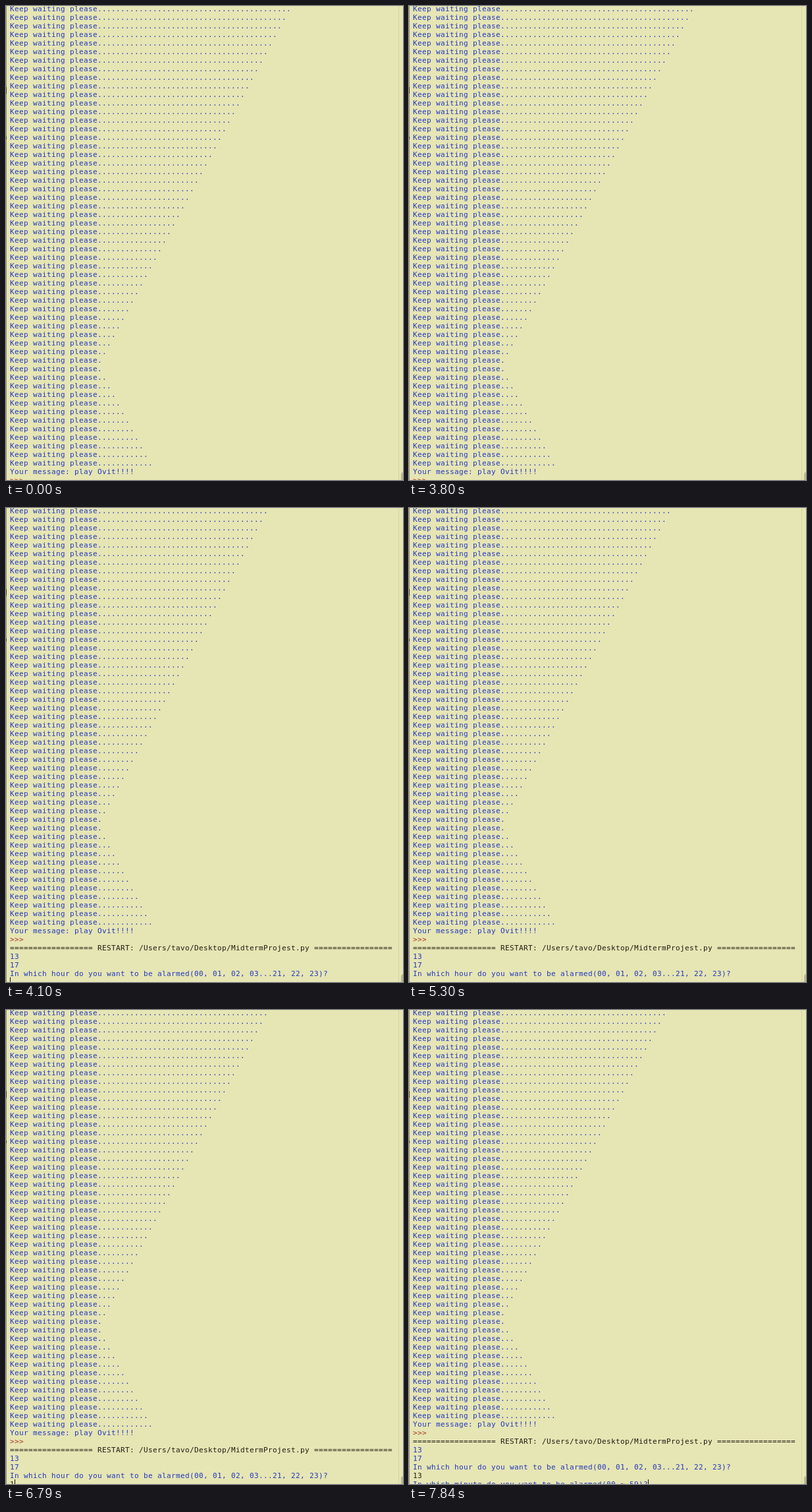
Animation of 603x719 px, one loop 7.99 s. Source, as an HTML page:

```html
<!DOCTYPE html>
<html lang="en">
<head>
<meta charset="utf-8">
<title>Alarm shell</title>
<style>
  html, body { margin: 0; width: 100%; height: 100%; overflow: hidden; }
  body { position: relative; background: #e6e5b4; }
  #text {
    position: absolute; left: 6px; top: -2px; margin: 0;
    font: 11px/13px "DejaVu Sans Mono", monospace;
    letter-spacing: calc(7px - 1ch);
    color: #2237bd;
  }
  .prompt { color: #a8361c; }
  .plain { color: #1d1c12; }
  #cursor { position: absolute; top: 712px; width: 1px; height: 13px; background: #14140c; }
  #shade {
    position: absolute; left: 1px; top: 0; width: 23px; height: 100%;
    background: linear-gradient(90deg, rgba(40, 40, 15, .32), rgba(40, 40, 15, .12) 30%, rgba(40, 40, 15, 0));
  }
  #edge { position: absolute; left: 0; top: 0; width: 1px; height: 100%; background: #96957a; }
  #edge::before, #edge::after { content: ""; position: absolute; width: 1px; background: #45452f; }
  #edge::before { top: 123px; height: 10px; }
  #edge::after { top: 198px; height: 4px; }
  #track { position: absolute; left: 596px; top: 0; width: 1px; height: 100%; background: #d3d2a4; }
  #thumb { position: absolute; left: 600px; top: 707px; width: 8px; height: 20px; border-radius: 4px; background: #b9b88e; }
</style>
</head>
<body>
<pre id="text"></pre>
<div id="cursor"></div>
<div id="shade"></div>
<div id="edge"></div>
<div id="track"></div>
<div id="thumb"></div>
<script>
const DURATION = 7990, ROW = 13, COLUMN = 7, LEFT = 6;
const el = id => document.getElementById(id);
const waiting = dots => ["", "Keep waiting please" + ".".repeat(dots)];

const minuteQuestion = "In which minute do you want to be alarmed(00 ~ 59)?";
const transcript = typed => [
  ...Array.from({ length: 42 }, (_, i) => waiting(42 - i)),
  ...Array.from({ length: 12 }, (_, i) => waiting(i + 1)),
  ["", "Your message: play Ovit!!!!"],
  ["prompt", ">>>"],
  ["plain", "=".repeat(18) + " RESTART: /Users/tavo/Desktop/MidtermProjest.py " + "=".repeat(17)],
  ["", "13"],
  ["", "17"],
  ["", "In which hour do you want to be alarmed(00, 01, 02, 03...21, 22, 23)?"],
  ["plain", typed],
  ["", minuteQuestion]
];

// start, rows scrolled, lines printed, typed text, cursor column (-1 hides it), shaded edge
const steps = [
  [0, 0, 56, "", -1, false],
  [500, 0, 56, "", -1, true],
  [3800, 0, 56, "", -1, false],
  [3950, 2, 57, "", 0, false],
  [4100, 5, 61, "", 0, false],
  [4400, 5, 61, "", -1, false],
  [4700, 5, 61, "", 0, false],
  [5300, 5, 61, "", -1, false],
  [5600, 5, 61, "1", 1, false],
  [5750, 5, 61, "12", 2, false],
  [6190, 5, 61, "12", -1, false],
  [6490, 5, 61, "12", 2, false],
  [6790, 5, 61, "1", 1, false],
  [7090, 5, 61, "13", -1, false],
  [7390, 5, 61, "13", 2, false],
  [7840, 6, 62, "13", minuteQuestion.length, false]
];

function makeLine([className, content]) {
  const span = document.createElement("span");
  span.className = className;
  span.textContent = content + "\n";
  return span;
}

function show([, scroll, count, typed, column, shaded]) {
  el("text").replaceChildren(...transcript(typed).slice(scroll, count).map(makeLine));
  el("cursor").hidden = column < 0;
  el("cursor").style.left = LEFT + column * COLUMN + "px";
  el("shade").hidden = !shaded;
}

const start = performance.now();
let current;
function tick() {
  const time = (performance.now() - start) % DURATION;
  const step = steps.findLast(([from]) => from <= time);
  if (step !== current) show(current = step);
  requestAnimationFrame(tick);
}
tick();
</script>
</body>
</html>
```
